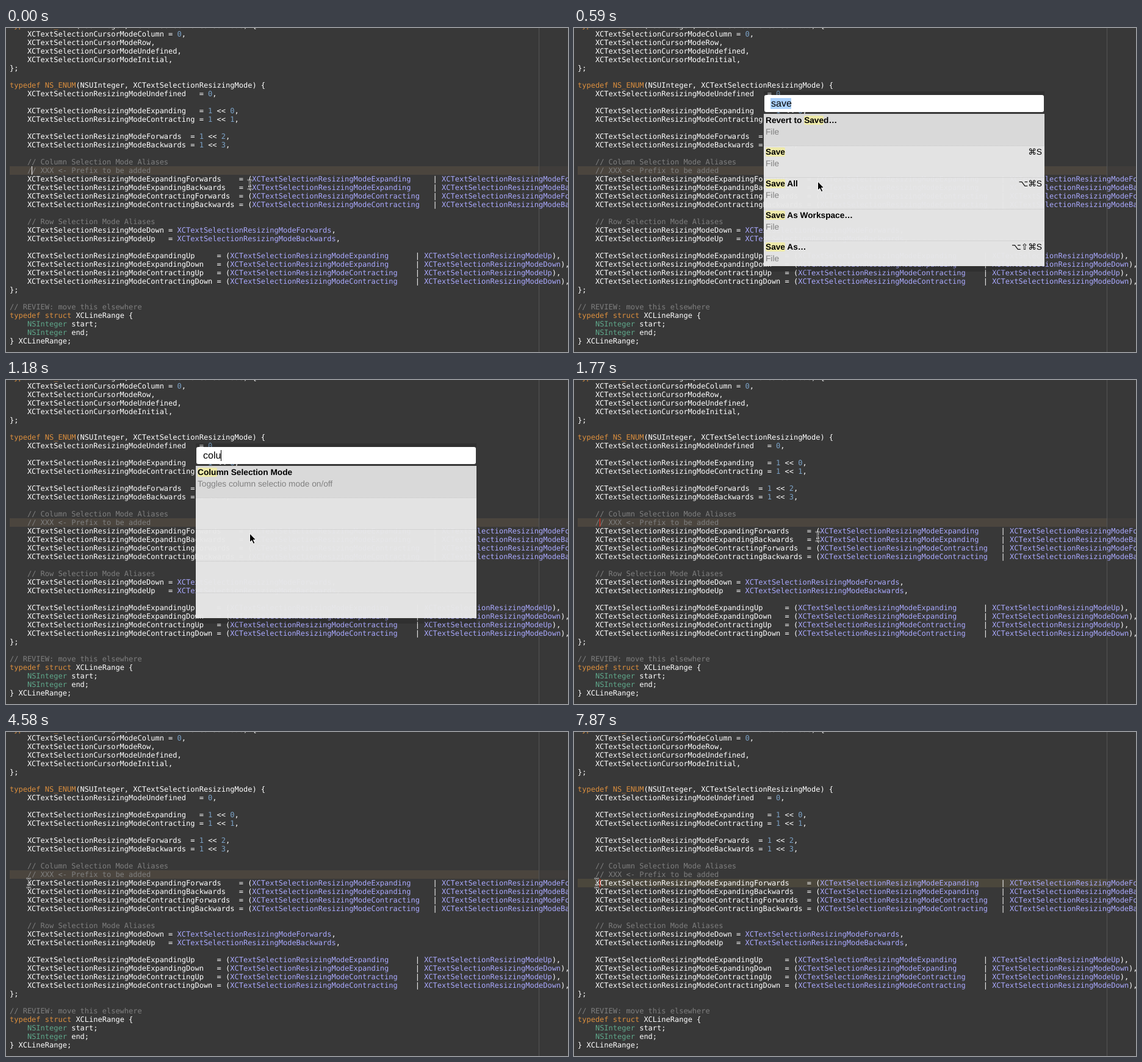
Write an HTML page that moves like this. It is 921 by 532 pixels and loops after 8 s.

```html
<!DOCTYPE html>
<html lang="en">
<head>
<meta charset="utf-8">
<title>Column selection</title>
<style>
html, body { margin: 0; width: 100%; height: 100%; overflow: hidden; background: #383838; }
svg { display: block; }
text { white-space: pre; text-rendering: geometricPrecision; }
.code { font: 12px "DejaVu Sans Mono", monospace; fill: #fff; }
.comment { fill: #7f7f7f; }
.keyword { fill: #dc8f3e; }
.type { fill: #5fa88b; }
.number { fill: #7ca3c8; }
.ref { fill: #aaa9ff; }
.panel { font: 13.7px "Liberation Sans", "DejaVu Sans", sans-serif; fill: #000; }
.title { font-weight: bold; }
.sub { fill: #808080; }
.query { font-size: 16px; }
</style>
</head>
<body>
<svg width="921" height="532" viewBox="0 0 921 532">
  <rect width="921" height="532" fill="#383838"/>
  <rect id="line" x="6" width="915" height="14"/>
  <rect x="873" width="48" height="532" fill="#3a3a3a" opacity=".6"/>
  <rect x="873" width="1" height="532" fill="#555"/>
  <g id="code" class="code"></g>
  <rect id="caret" x="42" width="1" height="14"/>
  <g id="panel" class="panel">
    <path d="M311 104h460v6H311zM311 391h460v9H311z" opacity=".15"/>
    <rect x="312" y="110" width="458" height="28" rx="3" fill="#fff"/>
    <rect x="311" y="141" width="460" height="250" fill="#e9e9e9" opacity=".97"/>
    <rect x="311" y="141" width="460" height="52" fill="#d9d9d9" opacity=".97"/>
    <path d="M311 193.5h460m-460 52h460m-460 52h460m-460 52h460" stroke="#c2c2c2" stroke-dasharray="1 1"/>
    <rect id="selection" x="322" y="115" width="34" height="18" fill="#acd2fd"/>
    <text id="query" class="query" x="323" y="129"></text>
    <rect id="queryCaret" y="115" width="1" height="18"/>
    <g id="saveList"></g>
    <g id="columnList"></g>
  </g>
  <g id="beam" fill="none" stroke-linecap="round">
    <path d="M-3-7.5Q0-7.500 0-5Q0-7.500 3-7.500M0-5V5M-3 7.500Q0 7.500 0 5Q0 7.500 3 7.500M-1.500 3H1.500" stroke="#ddd" stroke-width="2"/>
    <path d="M-3-7.500Q0-7.500 0-5Q0-7.500 3-7.500M0-5V5M-3 7.500Q0 7.500 0 5Q0 7.500 3 7.500" stroke="#111" stroke-width=".8"/>
  </g>
  <path id="arrow" d="M399.500 252v14.500l3.300-3.100 2.500 5.600 2.500-1.100-2.400-5.400h4.300z" stroke="#fff"/>
</svg>
<script>
const $ = id => document.getElementById(id);
const DURATION = 8000;

const mode = 'XCTextSelectionResizingMode';
const member = (name, column, value) => ('    ' + mode + name).padEnd(column) + '= ' + value;
const union = (name, column, base, other) => {
  const start = member(name, column, `(${mode}${base}`);
  return start.padEnd(column + 44 + (column === 47 ? 1 : 0)) + `| ${mode}${other}),`;
};

const lines = [
  'typedef NS_ENUM(NSUInteger, XCTextSelectionCursorMode) {',
  '    XCTextSelectionCursorModeColumn = 0,',
  '    XCTextSelectionCursorModeRow,',
  '    XCTextSelectionCursorModeUndefined,',
  '    XCTextSelectionCursorModeInitial,',
  '};',
  '',
  `typedef NS_ENUM(NSUInteger, ${mode}) {`,
  member('Undefined', 43, '0,'),
  '',
  member('Expanding', 43, '1 << 0,'),
  member('Contracting', 43, '1 << 1,'),
  '',
  member('Forwards', 41, '1 << 2,'),
  member('Backwards', 41, '1 << 3,'),
  '',
  '    // Column Selection Mode Aliases',
  '    // XXX <- Prefix to be added',
  union('ExpandingForwards', 52, 'Expanding', 'Forwards'),
  union('ExpandingBackwards', 52, 'Expanding', 'Backwards'),
  union('ContractingForwards', 52, 'Contracting', 'Forwards'),
  union('ContractingBackwards', 52, 'Contracting', 'Backwards'),
  '',
  '    // Row Selection Mode Aliases',
  member('Down', 36, mode + 'Forwards,'),
  member('Up', 36, mode + 'Backwards,'),
  '',
  union('ExpandingUp', 47, 'Expanding', 'Up'),
  union('ExpandingDown', 47, 'Expanding', 'Down'),
  union('ContractingUp', 47, 'Contracting', 'Up'),
  union('ContractingDown', 47, 'Contracting', 'Down'),
  '};',
  '',
  '// REVIEW: move this elsewhere',
  'typedef struct XCLineRange {',
  '    NSInteger start;',
  '    NSInteger end;',
  '} XCLineRange;'
];

const escapeText = s => s.replace(/&/g, '&amp;').replace(/</g, '&lt;');
const tokens = /(?<comment>\/\/.*)|(?<keyword>\b(?:typedef|struct|NS_ENUM)\b)|(?<type>\bNSInteger\b)|(?<number>\b\d\b)|(?<ref>(?<=[=(|] ?)XC\w+)/g;

function colour(line) {
  let html = '', last = 0;
  for (const match of line.matchAll(tokens)) {
    const kind = Object.keys(match.groups).find(key => match.groups[key]);
    html += escapeText(line.slice(last, match.index));
    html += `<tspan class="${kind}">${escapeText(match[0])}</tspan>`;
    last = match.index + match[0].length;
  }
  return html + escapeText(line.slice(last));
}

$('code').innerHTML = lines.map((line, i) =>
  `<text x="6" y="${i * 14}">${colour(line)}</text>`).join('');

// Each result: title, subtitle, shortcut, highlight offset and width
function results(items) {
  return items.map(([title, sub, keys = '', offset = 0, width = 32], i) => {
    const y = 141 + i * 52;
    return `<rect x="${314 + offset}" y="${y + 3}" width="${width}" height="15" rx="2" fill="#f0eba0" opacity=".85"/>
      <text class="title" x="314" y="${y + 15}">${title}</text>
      <text class="sub" x="314" y="${y + 34}">${sub}</text>
      <text x="767" y="${y + 15}" text-anchor="end">${keys}</text>`;
  }).join('');
}

$('saveList').innerHTML = results([
  ['Revert to Saved…', 'File', '', 63],
  ['Save', 'File', '⌘S'],
  ['Save All', 'File', '⌥⌘S'],
  ['Save As Workspace…', 'File'],
  ['Save As…', 'File', '⌥⇧⌘S']
]);
$('columnList').innerHTML = results([
  ['Column Selection Mode', 'Toggles column selectio mode on/off']
]);

// Steps are [start time, ...values]; each holds until the next
const at = (steps, t) => steps.findLast(step => t >= step[0]).slice(1);

const queries = [[0, ''], [450, 'save'], [740, 'c'], [890, 'co'], [1030, 'col'], [1180, 'colu']];
const blinks = [[0, 1], [150, 0], [1770, 1], [2520, 0], [2970, 1], [3560, 0], [3990, 1],
  [4580, 0], [5030, 1], [5620, 0], [6220, 1], [6820, 0], [7270, 1]];
const pointer = [[0, 399.5, 257], [2220, 390, 259], [2370, 230, 266], [2520, 80, 260], [2670, 36.5, 249],
  [2970, 41, 246], [3120, 36, 240], [3260, 29, 233], [3410, 21.5, 205], [3560, 24, 168.5],
  [3700, 30, 190], [3850, 35, 225], [3990, 37, 247], [4280, 37, 248]];

const show = (id, visible) => $(id).setAttribute('visibility', visible ? 'inherit' : 'hidden');

function render(t) {
  const open = t >= 300 && t < 1770;
  const [query] = at(queries, t);
  const moved = t >= 7870;
  const y = moved ? 241 : 227;

  $('line').setAttribute('y', y);
  $('line').setAttribute('fill', moved ? '#4b473c' : '#4b453e');
  $('caret').setAttribute('y', y);
  $('caret').setAttribute('fill', t < 1770 ? '#fff' : '#ff2010');
  show('caret', at(blinks, t)[0]);

  show('panel', open);
  show('arrow', open);
  show('beam', !open);
  $('beam').setAttribute('transform', `translate(${at(pointer, t)})`);

  $('query').textContent = query;
  show('selection', query === 'save');
  show('queryCaret', query !== 'save');
  $('queryCaret').setAttribute('x', Math.round(323 + (query ? $('query').getComputedTextLength() : 0)));
  show('saveList', query === 'save' || query === 'c');
  show('columnList', query.startsWith('co'));
  $('columnList').querySelector('rect').setAttribute('width', 8 * query.length);
}

const start = performance.now();
function tick() {
  render((performance.now() - start) % DURATION);
  requestAnimationFrame(tick);
}
tick();
</script>
</body>
</html>
```
